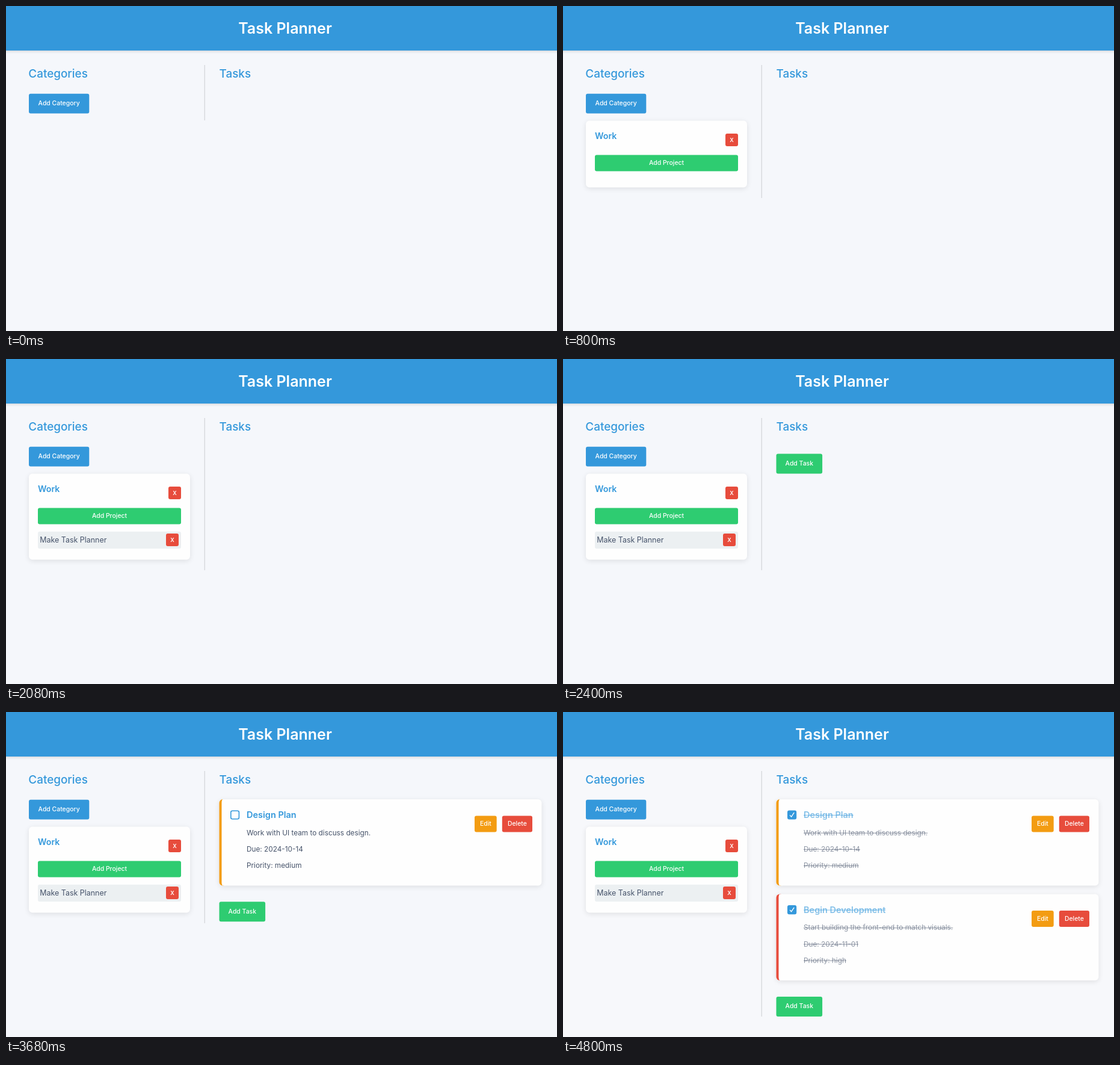
Recreate the animation shown at these times as an HTML page with a canvas. Size 916 px wide and 540 px high, loop 5600 ms.

```html
<!DOCTYPE html>
<html lang="en">
<head>
<meta charset="utf-8">
<title>Task Planner</title>
<style>
  html, body { margin: 0; width: 100%; height: 100%; overflow: hidden; background: #f5f7fb; }
  canvas { display: block; width: 916px; height: 540px; }
</style>
</head>
<body>
<canvas id="stage"></canvas>
<script>
const WIDTH = 916, HEIGHT = 540, STEP = 800, STEPS = 7;
const BLUE = '#3498db', GREEN = '#2ecc71', RED = '#e74c3c', ORANGE = '#f39c12';
const INK = '#46536a', CARD = '#fefefe';

const canvas = document.getElementById('stage');
const ctx = canvas.getContext('2d');
const ratio = window.devicePixelRatio || 1;
canvas.width = WIDTH * ratio;
canvas.height = HEIGHT * ratio;
ctx.scale(ratio, ratio);

const tasks = [
  { title: 'Design Plan', color: ORANGE,
    lines: ['Work with UI team to discuss design.', 'Due: 2024-10-14', 'Priority: medium'] },
  { title: 'Begin Development', color: RED,
    lines: ['Start building the front-end to match visuals.', 'Due: 2024-11-01', 'Priority: high'] }
];

function box(x, y, w, h, radius, color) {
  ctx.fillStyle = color;
  ctx.beginPath();
  ctx.roundRect(x, y, w, h, radius);
  ctx.fill();
}

function shadowed(draw, blur, offset, alpha) {
  ctx.save();
  ctx.shadowColor = `rgba(0, 0, 0, ${alpha})`;
  ctx.shadowBlur = blur * ratio;
  ctx.shadowOffsetY = offset * ratio;
  draw();
  ctx.restore();
}

function text(label, x, y, size, weight, color, align = 'left', strike = false) {
  ctx.font = `${weight} ${size}px Inter, "Open Sans", sans-serif`;
  ctx.fillStyle = color;
  ctx.textAlign = align;
  ctx.fillText(label, x, y);
  if (strike) ctx.fillRect(x, y - size * 0.31 - 0.5, ctx.measureText(label).width, 1);
}

function button(label, x, y, w, h, color, baseline) {
  box(x, y, w, h, 3, color);
  text(label, x + w / 2, y + baseline, 10.45, 500, '#fff', 'center');
}

function closeButton(x, y) {
  box(x, y, 21, 21, 3, RED);
  text('X', x + 10.5, y + 13.9, 9, 600, '#fff', 'center');
}

function header() {
  shadowed(() => { ctx.fillStyle = BLUE; ctx.fillRect(-10, -10, WIDTH + 20, 84); }, 4, 1.6, 0.12);
  text('Task Planner', 464, 46, 25, 600, '#fff', 'center');
}

function sidebar(hasCard, hasProject) {
  text('Categories', 37.3, 118.7, 18.9, 500, BLUE);
  button('Add Category', 38, 145.8, 100.3, 32.7, BLUE, 19.2);
  if (!hasCard) return;

  shadowed(() => box(38, 190.5, 268, hasProject ? 143 : 111, 6, CARD), 8, 2, 0.1);
  text('Work', 53, 221, 14.2, 600, BLUE);
  closeButton(270, 212);
  button('Add Project', 53, 247.5, 238, 27, GREEN, 16.4);
  if (hasProject) {
    box(53, 286.8, 238, 28.2, 3, '#ecf0f2');
    text('Make Task Planner', 56.3, 304.5, 12.45, 400, INK);
    closeButton(266, 290);
  }
}

function checkbox(x, y, checked) {
  if (!checked) {
    ctx.strokeStyle = BLUE;
    ctx.lineWidth = 1.6;
    ctx.beginPath();
    ctx.roundRect(x + 0.8, y + 0.8, 13.6, 13.6, 2.5);
    ctx.stroke();
    return;
  }
  box(x, y, 15.2, 15.2, 3, BLUE);
  ctx.strokeStyle = '#fff';
  ctx.lineWidth = 1.3;
  ctx.beginPath();
  ctx.moveTo(x + 4.2, y + 8);
  ctx.lineTo(x + 6.6, y + 10.7);
  ctx.lineTo(x + 11.2, y + 3.8);
  ctx.stroke();
}

function taskCard(task, y, done, hovered) {
  const x = 354.5, w = 536, h = 143.5;
  const inner = { x: 2, y: 6 };
  shadowed(() => box(x, y, w, h, 6, CARD), 8, hovered ? 3 : 2, hovered ? 0.13 : 0.1);
  box(x, y, 8, h, [6, 0, 0, 6], task.color);
  box(x + 4, y, 6, h, [inner, 0, 0, inner], CARD);

  checkbox(373, y + 18.4, done);
  ctx.globalAlpha = done ? 0.6 : 1;
  text(task.title, 400, y + 31, 14.5, 600, BLUE, 'left', done);
  task.lines.forEach((line, i) => text(line, 400, y + 59.8 + i * 27.2, 11.8, 400, INK, 'left', done));
  ctx.globalAlpha = 1;
  button('Edit', 779, y + 27.5, 36.7, 27, ORANGE, 16.7);
  button('Delete', 824.8, y + 27.5, 50.2, 27, RED, 16.7);
}

function taskList(step) {
  text('Tasks', 354.5, 118.7, 18.9, 500, BLUE);
  if (step < 3) return;
  const count = [0, 1, 2, 2][step - 3];
  for (let i = 0; i < count; i++) {
    const hovered = step === 5 && i === 0;
    taskCard(tasks[i], 145 + i * 157.6 - (hovered ? 2.3 : 0), step - i >= 5, hovered);
  }
  button('Add Task', 354.5, 157.5 + count * 157.8, 76.6, 33, GREEN, 19.3);
}

function render(step) {
  ctx.fillStyle = step < 5 ? '#f5f7fb' : '#f7f8fb';
  ctx.fillRect(0, 0, WIDTH, HEIGHT);
  header();
  const dividerEnd = step < 1 ? 190 : step < 2 ? 319 : step < 5 ? 351 : 506;
  ctx.fillStyle = '#c9ccd1';
  ctx.fillRect(329.7, 98, 1, dividerEnd - 98);
  sidebar(step >= 1, step >= 2);
  taskList(step);
}

const start = performance.now();
function tick() {
  render(Math.floor((performance.now() - start) / STEP) % STEPS);
  requestAnimationFrame(tick);
}
tick();
</script>
</body>
</html>
```
